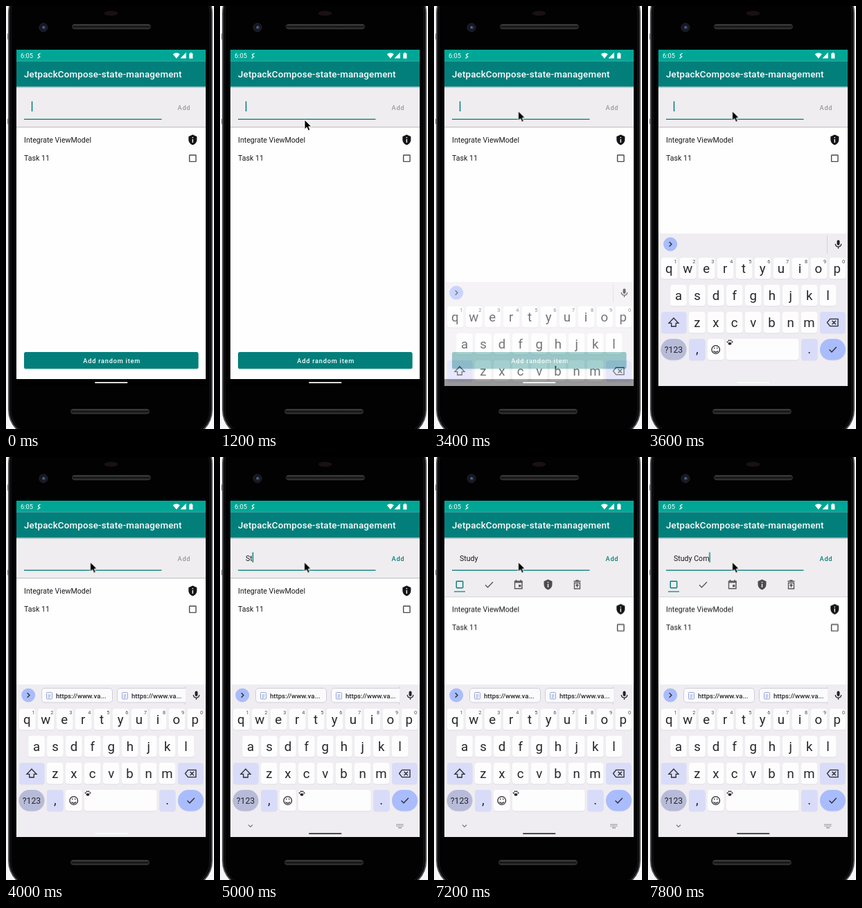
An HTML page that plays this animation: 300 px wide and 610 px high, repeating every 8000 ms.

```html
<!DOCTYPE html>
<html lang="en">
<head>
<meta charset="utf-8">
<title>Task list on a phone</title>
<style>
  html, body { margin: 0; width: 100%; height: 100%; overflow: hidden; background: #f6f5f7; }
  svg { display: block; width: 300px; height: 610px; font-family: Roboto, "Noto Sans", sans-serif; }
  .teal { fill: #037f7b; }
  .body { font-size: 10.6px; fill: #1b1b1d; }
  .label { font-size: 9.2px; font-weight: 500; letter-spacing: .78px; }
  .letter { font-size: 18.6px; fill: #26262a; text-anchor: middle; }
  .hint { font-size: 7.4px; fill: #4c4c52; text-anchor: middle; }
  .chip { font-size: 9.6px; font-weight: 500; fill: #26262a; }
  .line { fill: none; stroke: #2a2a30; stroke-width: 1.3; }

  .anim { animation: 8s step-end -20ms infinite; }
  #pointer { animation-name: point; }
  #typing { animation-name: type; }
  #caret { animation-name: blink; }
  #add { animation-name: enable; }
  #panel { animation-name: grow; }
  #keyboard { animation-name: rise; }
  #chips { animation-name: suggest; }
  #nav { animation-name: nav; }

  @keyframes point {
    0% { transform: translate(-20px, 400px); }
    2.5% { transform: translate(2px, 385px); }
    5% { transform: translate(38px, 314px); }
    7.5% { transform: translate(73px, 249px); }
    10% { transform: translate(100px, 204px); }
    12.5% { transform: translate(116px, 175px); }
    15% { transform: translate(122px, 164px); }
    17.5% { transform: translate(122px, 162px); }
    20% { transform: translate(122px, 158px); }
    22.5% { transform: translate(121.5px, 154px); }
    25%, 100% { transform: translate(121.5px, 151.5px); }
  }
  @keyframes type {
    0% { transform: translateX(0); }
    55% { transform: translateX(6.3px); }
    62.5% { transform: translateX(9.8px); }
    67.5% { transform: translateX(21.6px); }
    70% { transform: translateX(29.2px); }
    92.5% { transform: translateX(36.1px); }
    95% { transform: translateX(42.2px); }
    97.5%, 100% { transform: translateX(51.4px); }
  }
  @keyframes blink {
    0%, 12.5%, 30%, 42.5%, 55%, 85%, 92.5%, 100% { opacity: 1; }
    7.5%, 22.5%, 35%, 50%, 77.5%, 90% { opacity: 0; }
  }
  @keyframes enable {
    0% { fill: #99999c; }
    55%, 100% { fill: #037f7b; }
  }
  @keyframes grow {
    0% { transform: translateY(0); }
    67.5% { transform: translateY(15px); }
    70%, 100% { transform: translateY(26.5px); }
  }
  @keyframes rise {
    0% { transform: translateY(220px); opacity: 0; }
    42.5% { transform: translateY(70px); opacity: .64; }
    45%, 100% { transform: translateY(0); opacity: 1; }
  }
  @keyframes suggest {
    0% { opacity: 0; }
    47.5% { opacity: .5; }
    50%, 100% { opacity: 1; }
  }
  @keyframes nav {
    0% { opacity: 0; }
    52.5% { opacity: .2; }
    55% { opacity: .4; }
    57.5% { opacity: .6; }
    60% { opacity: .8; }
    62.5%, 100% { opacity: 1; }
  }
</style>
</head>
<body>
<svg viewBox="0 0 300 610">
  <defs>
    <clipPath id="screen"><rect x="15" y="63" width="273" height="485"/></clipPath>
    <clipPath id="strip"><rect x="45" y="328" width="213.5" height="32"/></clipPath>
    <linearGradient id="bar" x2="0" y2="1">
      <stop offset="0" stop-color="#4a4a4c"/><stop offset=".5" stop-color="#111"/><stop offset="1" stop-color="#3a3a3c"/>
    </linearGradient>
    <g id="shield">
      <path d="M0-7.4 6-4.8V-.6C6 3.3 3.5 6.3 0 7.4-3.5 6.3-6 3.3-6-.6V-4.8Z"/>
      <path d="M0-1V4M0-4V-2.5" stroke="#f4f4f6" stroke-width="1.4"/>
    </g>
    <rect id="box" x="-4.7" y="-4.7" width="9.4" height="9.4" rx=".7" fill="none" stroke-width="1.4"/>
    <g id="clip">
      <rect x="-4" y="-4.5" width="8" height="9.5" rx="1" fill="none" stroke="#92a4dd"/>
      <path d="M-2-4.5H2M-2-1H2M-2 1H2M-2 3H1" stroke="#92a4dd"/>
    </g>
  </defs>

  <!-- phone -->
  <path d="M4 40H2.5V48H4M4 163H2.5V170H4" fill="#777" stroke="#888"/>
  <rect x="4" y="-30" width="293" height="652" rx="40" fill="#050506" stroke="#4b4b4e" stroke-width="2"/>
  <rect x="7" y="-27" width="287" height="646" rx="37" fill="#020203" stroke="#1d1d20"/>
  <ellipse cx="151.500" cy="10.500" rx="10" ry="3.500" fill="#191015"/>
  <rect x="95.500" y="26.500" width="113" height="6.500" rx="3.200" fill="url(#bar)" stroke="#3b3b3d" stroke-width=".8"/>
  <rect x="93.500" y="581.500" width="113" height="6.500" rx="3.200" fill="url(#bar)" stroke="#3b3b3d" stroke-width=".8"/>
  <circle cx="54" cy="31" r="6" fill="#15171e" stroke="#26272c"/>
  <circle cx="54.500" cy="31" r="2.600" fill="#2f3d63"/>
  <circle cx="54" cy="30.500" r="1" fill="#7184b4"/>

  <g clip-path="url(#screen)">
    <rect x="15" y="63" width="273" height="485" fill="#efedf0"/>

    <!-- add form -->
    <text class="body" x="37" y="149.500">Study Com</text>
    <g id="typing" class="anim">
      <rect x="37" y="136" width="60" height="18" fill="#efedf0"/>
      <rect id="caret" class="anim teal" x="36.800" y="137.500" width="1.500" height="14.500"/>
    </g>
    <rect class="teal" x="26" y="162.700" width="198.500" height="1.300"/>
    <text id="add" class="anim label" x="247.500" y="149.500">Add</text>

    <!-- icon picker -->
    <use href="#box" x="37" y="184" stroke="#037f7b"/>
    <rect class="teal" x="29" y="193.500" width="16" height="1.200"/>
    <path d="M74 184.500 77.500 188 85 180.300" fill="none" stroke="#59595c" stroke-width="1.400"/>
    <g fill="none" stroke="#59595c" stroke-width="1.400">
      <path d="M116.500 179.300H127V189.800H116.500Z"/>
      <path d="M116 180.200H127.500" stroke-width="2.600"/>
      <path d="M118.500 177V179M125 177V179"/>
      <path d="M122 185.800H125.500" stroke-width="3.200"/>
      <path d="M202.500 181.500V190H210.500V181.500ZM201.500 179.300H211.500M204.500 178H208.500"/>
      <path d="M206.500 183.500V188M204.500 185.500 206.500 183.500 208.500 185.500"/>
    </g>
    <use href="#shield" x="164.500" y="184" fill="#4c4c4f"/>

    <!-- list -->
    <g id="panel" class="anim">
      <rect x="15" y="174.500" width="273" height="380" fill="#fefefe"/>
      <rect x="15" y="174" width="273" height="1.200" fill="#c6c5c8"/>
      <rect x="15" y="175.200" width="273" height="1" fill="#ededee"/>
      <text class="body" x="26" y="196.800">Integrate ViewModel</text>
      <text class="body" x="26" y="223.300">Task 11</text>
      <use href="#shield" x="269.300" y="193" fill="#151517"/>
      <use href="#box" x="269.300" y="219.700" stroke="#4a4a4d"/>
    </g>

    <rect x="26" y="500" width="251.500" height="24.500" rx="3" fill="#cfd6d7"/>
    <rect class="teal" x="26" y="499" width="251.500" height="24" rx="2.500"/>
    <text class="label" x="111.300" y="514.700" fill="#fff">Add random item</text>

    <!-- bars -->
    <rect x="15" y="63" width="273" height="16.500" fill="#00a695"/>
    <rect class="teal" x="15" y="79.500" width="273" height="37"/>
    <rect x="15" y="116.500" width="273" height="1.200" fill="#9fbab9"/>
    <text x="21" y="74.700" font-size="9.300" fill="#f4fffd">6:05</text>
    <path d="M49.500 68.300 46.500 70.300 47.500 72M47 72 48.800 73 45.500 75.500" fill="none" stroke="#e8fffb" stroke-width="1.300"/>
    <path d="M240.800 69.500Q245.800 65.500 250.800 69.500L245.800 75.700ZM259.800 67V75.500H251.500ZM264.300 68.300H265.700V67.200H268V68.300H269.400V75.700H264.300Z" fill="#fff"/>
    <text x="26" y="103.300" font-size="13.300" font-weight="500" letter-spacing=".19" fill="#fff">JetpackCompose-state-management</text>
    <rect x="15" y="538" width="273" height="10" fill="#000"/>

    <!-- keyboard -->
    <g id="keyboard" class="anim">
      <rect x="15" y="328" width="273" height="225" fill="#efedf1"/>
      <circle cx="32.200" cy="343.500" r="10" fill="#a9bcfb"/>
      <path class="line" d="M30.700 340.300 34 343.500 30.700 346.700"/>
      <rect x="258" y="331" width="1" height="26" fill="#d3d2d7"/>
      <rect x="272.500" y="337.500" width="4" height="7.500" rx="2" fill="#222"/>
      <path class="line" d="M270.300 343C270.300 348.500 278.700 348.500 278.700 343M274.500 347V350"/>
      <g id="keys"></g>
      <path class="line" d="M37 450 44 457.300H40.300V462H33.700V457.300H30Z"/>
      <path class="line" d="M258.500 456.500 262.500 451.300H274V461.700H262.500ZM265.500 453.800 271 459.200M271 453.800 265.500 459.200"/>
      <text x="37" y="500" font-size="12.200" text-anchor="middle" fill="#26262a">?123</text>
      <circle class="line" cx="97.700" cy="495.500" r="5.800"/>
      <path class="line" d="M94.500 497.500Q97.700 501 100.900 497.500M95.700 492.500V494.300M99.700 492.500V494.300"/>
      <g fill="#26262a">
        <ellipse cx="118" cy="486.800" rx="2.500" ry="1.900"/>
        <circle cx="114.700" cy="484.500" r="1.100"/><circle cx="116.800" cy="482.300" r="1.100"/>
        <circle cx="119.400" cy="482.300" r="1.100"/><circle cx="121.500" cy="484.500" r="1.100"/>
      </g>
      <path class="line" d="M261.500 495.500 265 499 271.800 491.800"/>
      <g id="chips" class="anim" clip-path="url(#strip)">
        <rect x="51.500" y="333.500" width="102" height="20.500" rx="4.500" fill="#fbfafd" stroke="#cfced6"/>
        <rect x="160.500" y="333.500" width="104" height="20.500" rx="4.500" fill="#fbfafd" stroke="#cfced6"/>
        <use href="#clip" x="62.500" y="344"/>
        <use href="#clip" x="171.500" y="344"/>
        <text class="chip" x="72" y="347.600">https://www.va...</text>
        <text class="chip" x="181" y="347.600">https://www.va...</text>
      </g>
    </g>

    <rect x="128" y="542.200" width="47.500" height="1.700" rx=".8" fill="#fafafa"/>
    <g id="nav" class="anim">
      <rect x="128" y="542.200" width="47.500" height="1.700" rx=".8" fill="#333337"/>
      <path d="M41 530.500 44 533.500 47 530.500" fill="none" stroke="#77777c" stroke-width="1.100"/>
      <path d="M254.500 530H264.500M254.500 532.300H264.500" stroke="#85858a" stroke-width="1.300" stroke-dasharray="1.300 .8"/>
      <path d="M257 534.700H262" stroke="#85858a" stroke-width="1.200"/>
    </g>
  </g>

  <g id="pointer" class="anim">
    <path d="M0 0V13.800L3.200 10.900 5.300 15.700 7.900 14.600 5.800 9.900H10Z" fill="#000" stroke="#fff" stroke-width="1"/>
  </g>
</svg>
<script>
  const key = (x, y, w, fill = '#fdfdfe', r = 4) =>
    `<rect x="${x}" y="${y + 1}" width="${w}" height="30.500" rx="${r}" fill="#dddce2"/>` +
    `<rect x="${x}" y="${y}" width="${w}" height="30.500" rx="${r}" fill="${fill}"/>`;
  const label = (ch, x, y, cls = 'letter') => `<text class="${cls}" x="${x}" y="${y}">${ch}</text>`;
  const pitch = 26.95;

  const row = (chars, x0, y, hints = '') => [...chars].map((ch, i) => {
    const x = x0 + i * pitch;
    return key(x - 11.8, y, 23.6) + label(ch, x - (hints ? .5 : 0), y + 21.5) +
      (hints ? label(hints[i], x + 8.7, y + 8, 'hint') : '');
  }).join('');

  const soft = '#d9dcf9';
  document.getElementById('keys').innerHTML =
    row('qwertyuiop', 30.8, 363, '1234567890') +
    row('asdfghjkl', 44, 402) +
    row('zxcvbnm', 70.8, 441) +
    key(19, 441, 36.5, soft) + key(248, 441, 36.5, soft) +
    key(18.5, 480, 37, '#b7bbd8', 15.2) +
    key(59, 480, 23.6, soft) + label(',', 70.8, 501) +
    key(86, 480, 23.6) + key(113, 480, 104.5) +
    key(221, 480, 23.6, soft) + label('.', 232.8, 501) +
    key(248, 480, 37, '#a9bcfd', 15.2);
</script>
</body>
</html>
```
